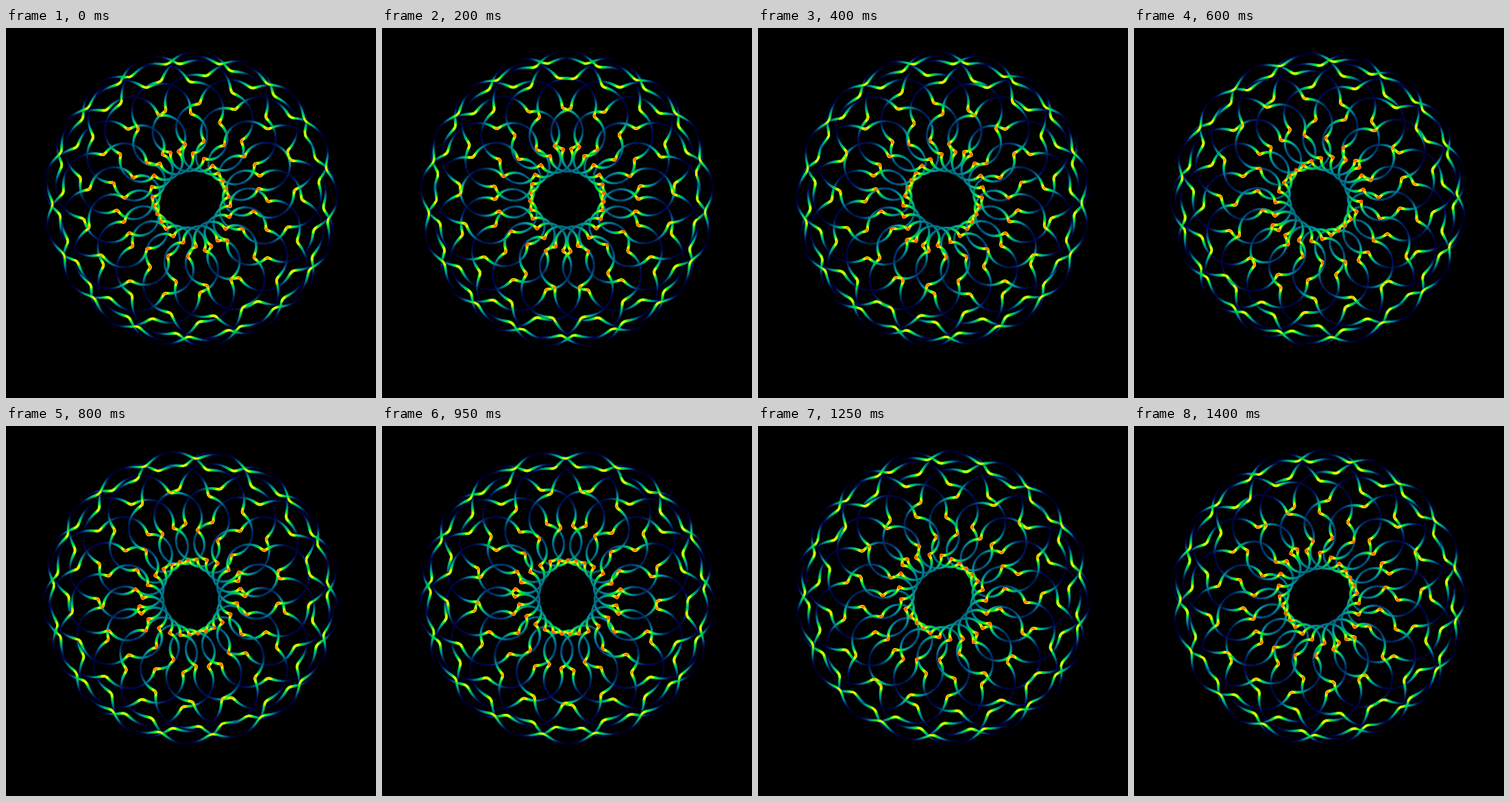
Recreate the animation shown at these times as an HTML page with a canvas. Size 540 by 540 pixels, loop 1.45 s.

```html
<!DOCTYPE html>
<html>
<head>
<meta charset="utf-8">
<title>Rotating rosette</title>
<style>
html, body { margin: 0; width: 100%; height: 100%; overflow: hidden; background: #000; }
canvas { display: block; width: 540px; height: 540px; }
</style>
</head>
<body>
<canvas id="stage" width="540" height="540"></canvas>
<script>
const ctx = document.getElementById('stage').getContext('2d');
const TAU = Math.PI * 2;
const LOOP = 1450, STEP = 50, SYMMETRIC_AT = 188;
const CENTER = { x: 270, y: 249.8 };
const SAMPLES = 6000, LEVELS = 72, MAX_SPEED = 3600;

// The curve is a sum of three rotating arms; only the smallest shifts phase over time.
const ARMS = [
  { radius: 128.5, turns: 4 },
  { radius: 81, turns: 23 },
  { radius: 7, turns: 167 }
];

// Colour by drawing speed: slow bends glow red, fast arcs fade to black.
const STOPS = [
  [3600, 0, 0, 0], [3300, 0, 0, 36], [3000, 0, 6, 72], [2700, 0, 56, 104],
  [2500, 0, 108, 124], [2200, 0, 150, 135], [1950, 0, 190, 105], [1700, 0, 222, 50],
  [1450, 70, 240, 0], [1220, 225, 252, 0], [950, 255, 225, 0], [700, 255, 140, 0],
  [0, 255, 70, 0]
];

function colorFor(speed) {
  let i = 1;
  while (i < STOPS.length - 1 && speed < STOPS[i][0]) i++;
  const from = STOPS[i - 1], to = STOPS[i];
  const k = (from[0] - speed) / (from[0] - to[0]);
  const rgb = [1, 2, 3].map(c => Math.round(from[c] + (to[c] - from[c]) * k));
  return `rgb(${rgb})`;
}

const levelSpeed = level => MAX_SPEED * (1 - (level + 0.5) / LEVELS);
const coreColors = Array.from({ length: LEVELS }, (_, i) => colorFor(levelSpeed(i)));
const edgeColors = Array.from({ length: LEVELS }, (_, i) =>
  colorFor(Math.min(MAX_SPEED, levelSpeed(i) * 1.1 + 400)));

function sample(t, phase) {
  let x = 0, y = 0, vx = 0, vy = 0;
  ARMS.forEach(({ radius, turns }, i) => {
    const angle = turns * t + (i === 2 ? phase : 0);
    const s = radius * Math.sin(angle), c = radius * Math.cos(angle);
    x += s;
    y -= c;
    vx += turns * c;
    vy += turns * s;
  });
  return { x: CENTER.x + x, y: CENTER.y + y, speed: Math.hypot(vx, vy) };
}

function buildPaths(phase) {
  const paths = Array.from({ length: LEVELS }, () => new Path2D());
  let last = sample(0, phase);
  for (let i = 1; i <= SAMPLES; i++) {
    const next = sample(TAU * i / SAMPLES, phase);
    const speed = (last.speed + next.speed) / 2;
    const level = Math.floor((1 - speed / MAX_SPEED) * LEVELS);
    const path = paths[Math.max(0, Math.min(LEVELS - 1, level))];
    path.moveTo(last.x, last.y);
    path.lineTo(next.x, next.y);
    last = next;
  }
  return paths;
}

function strokeAll(paths, colors, width) {
  ctx.lineWidth = width;
  paths.forEach((path, i) => {
    ctx.strokeStyle = colors[i];
    ctx.stroke(path);
  });
}

function draw(time) {
  const phase = TAU * (time - SYMMETRIC_AT) / LOOP;
  const paths = buildPaths(phase);
  ctx.fillStyle = '#000';
  ctx.fillRect(0, 0, 540, 540);
  ctx.lineCap = 'round';
  strokeAll(paths, edgeColors, 4.2);
  strokeAll(paths, coreColors, 3);
}

const start = performance.now();
let shown = -1;
function tick() {
  const elapsed = Math.max(0, performance.now() - start) % LOOP;
  const time = Math.floor(elapsed / STEP) * STEP;
  if (time !== shown) draw(shown = time);
  requestAnimationFrame(tick);
}
tick();
</script>
</body>
</html>
```
